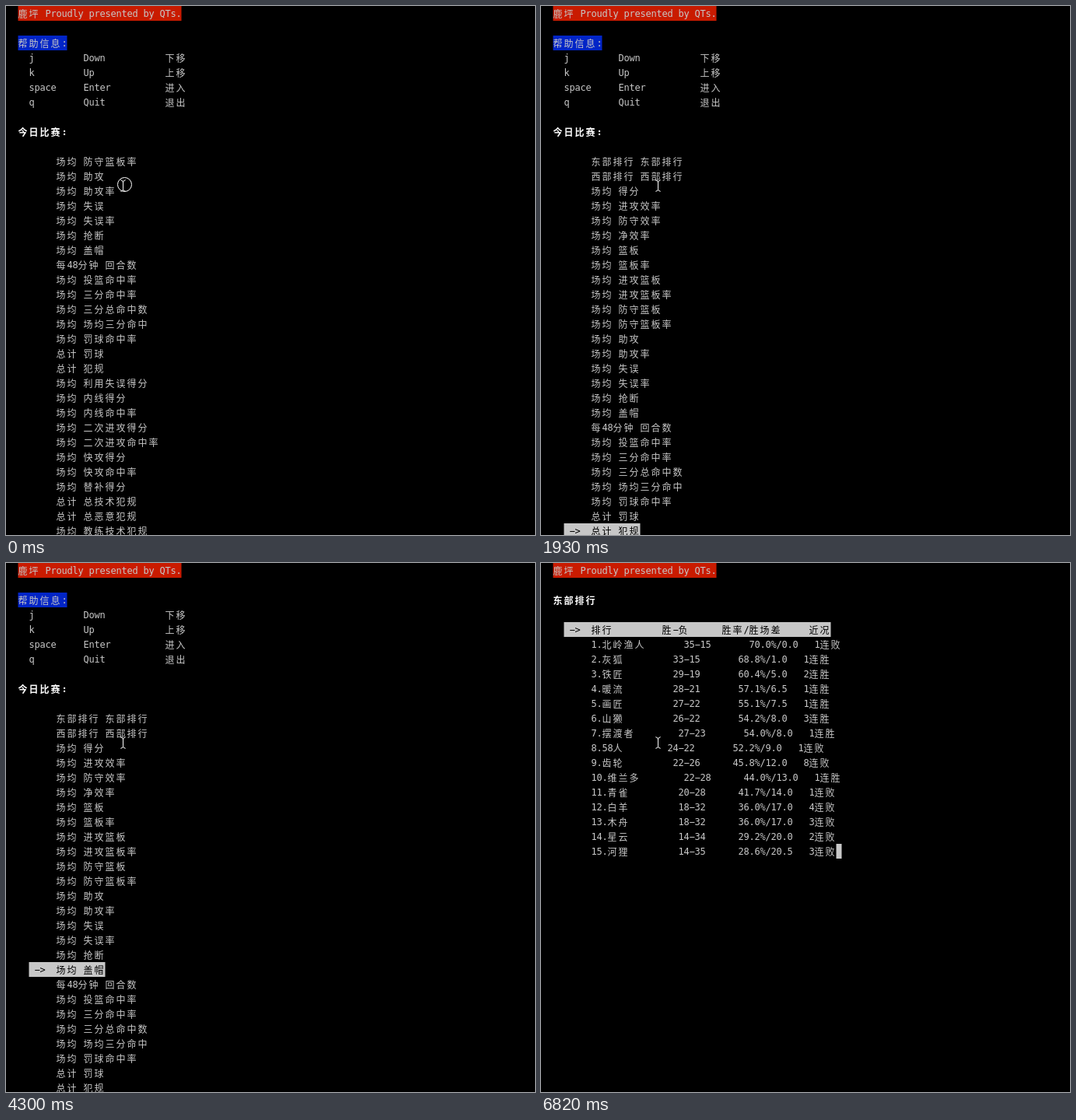
Write an HTML page that moves like this. It is 680x680 px and loops after 8000 ms.

```html
<!DOCTYPE html>
<html lang="zh-CN">
<head>
<meta charset="utf-8">
<title>Terminal</title>
<style>
  html, body { margin: 0; width: 100%; height: 100%; overflow: hidden; background: #000; }
  svg { display: block; width: 680px; height: 680px; background: #000; }
  text { font: 12px "DejaVu Sans Mono", "Noto Sans CJK SC", "Noto Sans CJK", monospace; white-space: pre; fill: #c7c7c7; }
  .bold { font-weight: 700; fill: #fff; }
  .inverse { fill: #000; }
</style>
</head>
<body>
<svg viewBox="0 0 680 680">
  <g id="banner"></g>
  <g id="menu"><g id="help"></g><g id="list"></g></g>
  <g id="table"></g>
  <g fill="none" stroke="#fff">
    <path d="M147.3 223.7Q150.5 224 150.5 227V235.5Q150.5 238 147.3 238.3M153.7 223.7Q150.5 224 150.5 227M150.5 235.5Q150.5 238 153.7 238.3"/>
    <circle id="click" cx="152.5" cy="229.5" r="9"/>
  </g>
</svg>
<script>
const LOOP = 8000, CELL = 7, LINE = 19, LEFT = 15.5;
const BASELINE = 14, WIDE_BASELINE = 14.6;
const GRAY = '#c7c7c7', RED = '#c91b00', BLUE = '#0225c7';
const byId = id => document.getElementById(id);
const cells = ch => ch.charCodeAt(0) > 0x2e80 ? 2 : 1;
const widthOf = str => [...str].reduce((sum, ch) => sum + cells(ch), 0);

function add(parent, tag, attrs, content = '') {
  const node = document.createElementNS('http://www.w3.org/2000/svg', tag);
  for (const key in attrs) node.setAttribute(key, attrs[key]);
  node.textContent = content;
  parent.append(node);
}

function print(parent, col, row, str, style = '') {
  let at = col;
  const xs = [], ys = [];
  for (const ch of str) {
    const size = cells(ch);
    xs.push(LEFT + at * CELL);
    ys.push(row * LINE + (size > 1 ? WIDE_BASELINE : BASELINE));
    at += size;
  }
  add(parent, 'text', { x: xs.join(' '), y: ys.join(' '), class: style }, str);
}

function fill(parent, col, row, count, color) {
  add(parent, 'rect', { x: LEFT + col * CELL, y: row * LINE, width: count * CELL, height: LINE, fill: color });
}

function label(parent, row, str, color) {
  fill(parent, 0, row, widthOf(str), color);
  print(parent, 0, row, str);
}

const perGame = names => names.split(' ').map(name => '场均 ' + name);
const items = [
  '东部排行 东部排行', '西部排行 西部排行',
  ...perGame('得分 进攻效率 防守效率 净效率 篮板 篮板率 进攻篮板 进攻篮板率 防守篮板 防守篮板率 助攻 助攻率 失误 失误率 抢断 盖帽'),
  '每48分钟 回合数',
  ...perGame('投篮命中率 三分命中率 三分总命中数 场均三分命中 罚球命中率'),
  '总计 罚球', '总计 犯规',
  ...perGame('利用失误得分 内线得分 内线命中率 二次进攻得分 二次进攻命中率 快攻得分 快攻命中率 替补得分'),
  '总计 总技术犯规', '总计 总恶意犯规', '场均 教练技术犯规'
];

const teams = `北岭渔人 35−15 70.0%/0.0 1连败
灰狐 33−15 68.8%/1.0 1连胜
铁匠 29−19 60.4%/5.0 2连胜
暖流 28−21 57.1%/6.5 1连胜
画匠 27−22 55.1%/7.5 1连胜
山獭 26−22 54.2%/8.0 3连胜
摆渡者 27−23 54.0%/8.0 1连胜
58人 24−22 52.2%/9.0 1连败
齿轮 22−26 45.8%/12.0 8连败
维兰多 22−28 44.0%/13.0 1连胜
青雀 20−28 41.7%/14.0 1连败
白羊 18−32 36.0%/17.0 4连败
木舟 18−32 36.0%/17.0 3连败
星云 14−34 29.2%/20.0 2连败
河狸 14−35 28.6%/20.5 3连败`.split('\n').map(line => line.split(' '));

// Time of each cursor move and the item it lands on
const moves = [
  [0, 37], [590, 36], [1030, 35], [1180, 34], [1330, 32], [1480, 30], [1630, 28], [1780, 27],
  [1930, 25], [2070, 23], [2220, 21], [2370, 20], [3410, 19], [3710, 18], [4300, 17],
  [4750, 16], [4900, 14], [5050, 12], [5200, 10], [5340, 9], [5490, 7], [5640, 5], [5780, 3],
  [5930, 2], [6080, 1], [6370, 0]
];
const OPEN_TABLE = 6820, CLICK_END = 140, LAST_ROW = 26;

function drawStatic() {
  label(byId('banner'), 0, '鹿坪 Proudly presented by QTs.', RED);

  const help = byId('help');
  label(help, 2, '帮助信息:', BLUE);
  [['j', 'Down', '下移'], ['k', 'Up', '上移'], ['space', 'Enter', '进入'], ['q', 'Quit', '退出']]
    .forEach((keys, i) => [2, 12, 27].forEach((col, k) => print(help, col, 3 + i, keys[k])));
  print(help, 0, 8, '今日比赛:', 'bold');

  const table = byId('table');
  print(table, 0, 2, '东部排行', 'bold');
  fill(table, 2, 4, 49, GRAY);
  [[3, '−>'], [7, '排行'], [20, '胜−负'], [31, '胜率/胜场差'], [47, '近况']]
    .forEach(([col, str]) => print(table, col, 4, str, 'inverse'));
  teams.forEach(([name, record, rate, streak], i) => {
    const row = 5 + i, title = `${i + 1}.${name}`;
    // Padding counts characters, so wide ones push the columns right
    const wide = widthOf(title) - title.length;
    const start = 20 + wide + (i > 8 ? 1 : 0);
    print(table, 7, row, title);
    print(table, start, row, record);
    print(table, start + 21 - rate.length, row, rate);
    print(table, start + 24, row, streak);
  });
  fill(table, 52, 19, 1, GRAY);
}

let shown = -1;
function drawList(selected) {
  if (selected === shown) return;
  shown = selected;
  const list = byId('list'), offset = Math.max(0, selected - LAST_ROW);
  list.replaceChildren();
  items.slice(offset, offset + LAST_ROW).forEach((str, i) => {
    const row = 10 + i, active = offset + i === selected;
    if (active) {
      fill(list, 2, row, 5 + widthOf(str), GRAY);
      print(list, 3, row, '−>', 'inverse');
    }
    print(list, 7, row, str, active ? 'inverse' : '');
  });
}

function render(t) {
  const inTable = t >= OPEN_TABLE;
  byId('menu').style.display = inTable ? 'none' : '';
  byId('table').style.display = inTable ? '' : 'none';
  byId('click').style.display = t < CLICK_END ? '' : 'none';
  drawList(moves.findLast(([time]) => time <= t)[1]);
}

const begin = performance.now();
function tick() {
  render((performance.now() - begin) % LOOP);
  requestAnimationFrame(tick);
}
drawStatic();
tick();
</script>
</body>
</html>
```
